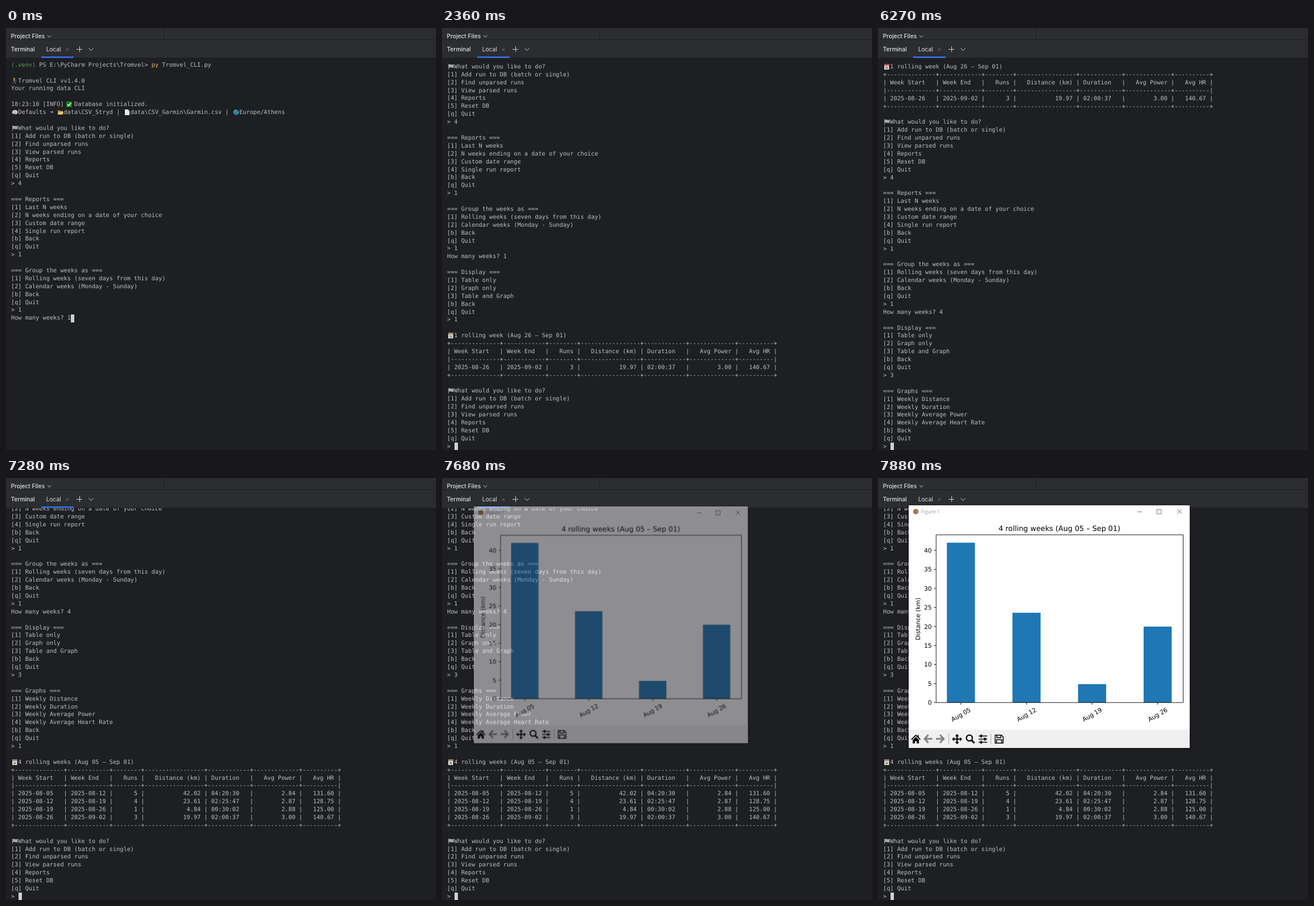
An HTML page that plays this animation: 756 px wide and 741 px high, repeating every 8000 ms.

```html
<!DOCTYPE html>
<html lang="en">
<head>
<meta charset="utf-8">
<title>Terminal report</title>
<style>
html, body { margin: 0; width: 100%; height: 100%; overflow: hidden; background: #1e1f22; }
#stage { position: absolute; left: 0; top: 0; width: 756px; height: 741px; overflow: hidden; background: #1e1f22; }
#stage > svg, #stage > div { position: absolute; }
#bars { left: 0; top: 0; }
#bars text { font: 500 10.2px Inter, sans-serif; fill: #dfe1e5; }
#term { left: 0; top: 53px; width: 756px; height: 688px; overflow: hidden; }

#log {
  position: absolute; left: 9px; top: 5.8px; margin: 0; white-space: pre; color: #bcbec4;
  font: 10.25px/13.89px "DejaVu Sans Mono", "Noto Sans Mono", monospace;
  text-rendering: geometricPrecision; font-variant-ligatures: none;
}
#log, #log span, #log i, #cursor, #win, #plot { animation: 8s step-end infinite; }
#log { animation-name: scroll; }
#log i { position: relative; font-style: normal; color: #a08a78; }
#log i svg { position: absolute; left: 0; top: 0; overflow: visible; }
#log .check svg { left: -2px; }
.venv { color: #5fa04e; }
.cmd { color: #e3c565; }
#log .display { animation-name: display; }
#log .key1 { animation-name: key1; }
#log .week { animation-name: week; }
#log .week .cal { animation-name: tint; }
#log .graphs { animation-name: graphs; }
#log .key2 { animation-name: key2; }
#log .month { animation-name: month; }

#cursor { left: 0; top: 0; width: 6px; height: 14px; background: #ced0d6; animation-name: place, blink; }
#win { left: 54px; top: 48px; transform-origin: 0 0; box-shadow: 0 1px 4px rgba(0, 0, 0, .4); animation-name: open; }
#plot { animation-name: plot; }
#win text { font-family: "DejaVu Sans", sans-serif; font-size: 10.64px; text-rendering: geometricPrecision; }

@keyframes scroll {
  0% { transform: none; }
  29.5% { transform: translateY(-108px); }
  66.875% { transform: translateY(-580px); }
  91%, 100% { transform: translateY(-844px); }
}
@keyframes display { 0% { opacity: 0; } 6.875%, 100% { opacity: 1; } }
@keyframes key1 { 0% { opacity: 0; } 19.25%, 100% { opacity: 1; } }
@keyframes week { 0% { opacity: 0; } 29.5%, 100% { opacity: 1; } }
@keyframes tint { 0% { color: #a08a78; } 66.875%, 100% { color: #c8493f; } }
@keyframes graphs { 0% { opacity: 0; } 66.875%, 100% { opacity: 1; } }
@keyframes key2 { 0% { opacity: 0; } 86.875%, 100% { opacity: 1; } }
@keyframes month { 0% { opacity: 0; } 91%, 100% { opacity: 1; } }
@keyframes place {
  0% { transform: translate(114px, 503px); }
  6.875% { transform: translate(22px, 614px); }
  19.25% { transform: translate(28px, 614px); }
  29.5% { transform: translate(22px, 728px); }
  86.875% { transform: translate(28px, 728px); }
  91%, 100% { transform: translate(22px, 728px); }
}
@keyframes blink {
  0%, 6.875%, 19.25%, 29.5%, 42.125%, 54.5%, 66.875%, 78.375%, 86.875%, 100% { opacity: 1; }
  6%, 13.5%, 26.125%, 36.125%, 48.75%, 61.125%, 72.625%, 85.25% { opacity: 0; }
}
@keyframes open {
  0% { opacity: 0; transform: none; }
  95.125% { opacity: .15; transform: translate(3px, 3.3px) scale(.956); }
  96% { opacity: .5; transform: translate(2px, 2px) scale(.975); }
  96.75% { opacity: .815; transform: translate(.8px, .8px) scale(.9885); }
  97.625% { opacity: .96; transform: translate(.3px, .3px) scale(.997); }
  98.5%, 100% { opacity: 1; transform: none; }
}
@keyframes plot { 0% { opacity: 0; } 96%, 100% { opacity: 1; } }
</style>
</head>
<body>
<div id="stage">
  <svg id="bars" width="756" height="53">
    <rect width="756" height="52" fill="#2b2d30"/>
    <path d="M0 20.5H756M277.5 0V20" stroke="#1e1f22"/>
    <text x="8.5" y="17.7">Project Files</text>
    <text x="8.5" y="41.2">Terminal</text>
    <text x="70.7" y="41.2" style="font-weight:400">Local</text>
    <path d="M62 51.3H119" stroke="#3574f0" stroke-width="2.4"/>
    <g fill="none" stroke="#ced0d6">
      <path d="M73 13l3.2 3.2L79.4 13M124 37.5h10M129.5 32v10M145.5 35.5l4 4 4-4"/>
      <path d="M105.5 35.5l5 5m0-5l-5 5" stroke="#7d8087" stroke-width=".8"/>
    </g>
  </svg>
  <div id="term"><pre id="log"></pre></div>
  <div id="cursor"></div>
  <svg id="win" width="494" height="426" viewBox="54 48 494 426">
    <path fill="#fff" d="M54 48h494v426H54z"/>
    <path fill="none" stroke="#666" stroke-width=".9" d="M456 59.5h8M490.5 55.500h7.5v7.5h-7.5zM526 55l8 8m0-8l-8 8"/>
    <g id="plot">
      <circle cx="66.5" cy="59" r="4.8" fill="#a8794f"/>
      <text x="76" y="62.3" fill="#999" style="font:8.8px 'Open Sans',sans-serif">Figure 1</text>
      <text x="319" y="93.3" text-anchor="middle" style="font-size:12.77px">4 rolling weeks (Aug 05 – Sep 01)</text>
      <text transform="translate(74 247.5) rotate(-90)" text-anchor="middle">Distance (km)</text>
      <g id="chart"></g>
      <path fill="none" stroke="#000" stroke-width=".9" d="M102.2 99.8H536.5V394.3H102.2z"/>
      <path fill="#f0f0f0" d="M54 442h494v32H54z"/>
      <path stroke="#a8a8a8" d="M124.5 448.5v19M198.5 448.5v19"/>
      <path d="M66.5 450.5l2.8 2.7v-1.7h2.2v3.8l3.5 3.4-1.2 1.2-7.3-7-7.3 7-1.2-1.2zM61 460l5.5-5.2 5.5 5.2v6h-4v-4h-3v4h-4z"/>
      <path fill="none" stroke="#808080" stroke-width="3" d="M88.5 451l-6.5 7 6.5 7M83 458h12.5M109 451l6.5 7-6.5 7M114.5 458H102"/>
      <path stroke="#000" stroke-width="2.2" d="M133 458.5h12M139 452.5v12"/>
      <path d="M139 449.5l3.5 4h-7zM139 467.5l3.5-4h-7zM130 458.5l4-3.5v7zM148 458.5l-4-3.5v7z"/>
      <circle cx="160.7" cy="456.5" r="5.2" fill="none" stroke="#000" stroke-width="2.3"/>
      <path stroke="#000" stroke-width="3" d="M164.5 460.5l5 5"/>
      <path stroke="#000" stroke-width="1.6" d="M177 453h15M177 458.5h15M177 464h15"/>
      <path stroke="#000" stroke-width="3" d="M181.5 450.5v5M188 456v5M181.5 461.5v5"/>
      <path fill="none" stroke="#000" stroke-width="1.5" d="M206 451.5h11l3 3v11h-14zM209 451.5v4.5h7v-4.5M208.5 465v-5.5h9v5.5"/>
    </g>
  </svg>
</div>
<script>
const art = {
  run: '<circle cx="5.5" cy="1.8" r="1.3" fill="#e0b080"/><path d="M3 4.5l3-.8 2.5 2" stroke="#e8a03c" fill="none"/><path d="M5.6 4v3l2 1.5.4 2.5M5.4 7L3 10" stroke="#7d86c8" fill="none"/>',
  check: '<rect y="1" width="10" height="10" rx="1" fill="#14871a"/><path d="M2 6l2.3 2.5L8.2 3.5" stroke="#fff" stroke-width="1.5" fill="none"/>',
  brain: '<path d="M2 7C1 4 4 1.5 7 2c3 0 5 2 4.5 4.5C11 9 9 9 8 10L6 8.5C4 9.5 2.5 9 2 7z" fill="#d6cabb"/><path d="M4 5.5c2-1 2 1 4 0M6 7.5h3" stroke="#9c9084" stroke-width=".7" fill="none"/>',
  folder: '<path d="M2 2.5h3.5l1 1H11V10H2z" fill="#b5803a"/><path d="M3.5 5H12l-1 5H2z" fill="#eabf6a"/>',
  page: '<path d="M2 1h5.5L10 3.5V11H2z" fill="#e9ebee"/><path d="M7.5 1v2.5H10z" fill="#9fa6ad"/>',
  globe: '<circle cx="6.5" cy="6" r="5" fill="#2472b8"/><path d="M3 3l3-1.5L7 4 5 6 4 8 2 6zM8 5l3 .5-1 3-2 1.5z" fill="#4fa04a"/>',
  flag: '<path d="M2.5 1v10" stroke="#8a8d8c"/><path d="M3 2c2-1 3 1 8.5 0v5.5C8 8.5 6 6.5 3 7.5z" fill="#a6aaa6"/>',
  cal: '<path d="M2 1h8.5v10H2z" fill="#dcdcd8"/><path d="M2 1h8.5v3H2z" fill="currentColor"/><path d="M4 6h2v3H4M7.5 6v3.5" stroke="#55585c" stroke-width=".9" fill="none"/>'
};
const icon = (name, gap = '  ') => `<i class="${name}">${gap}<svg width="12" height="12">${art[name]}</svg></i>`;
const part = (name, text) => `<span class="${name}">${text}</span>`;

const list = (title, items, back = '[b] Back\n') =>
  `\n\n${title}\n${items.map((s, i) => `[${i + 1}] ${s}\n`).join('')}${back}[q] Quit\n> `;
const menu = list(icon('flag') + 'What would you like to do?',
  ['Add run to DB (batch or single)', 'Find unparsed runs', 'View parsed runs', 'Reports', 'Reset DB'], '');
const reports = list('=== Reports ===',
  ['Last N weeks', 'N weeks ending on a date of your choice', 'Custom date range', 'Single run report']);
const group = list('=== Group the weeks as ===',
  ['Rolling weeks (seven days from this day)', 'Calendar weeks (Monday - Sunday)']);
const display = list('=== Display ===', ['Table only', 'Graph only', 'Table and Graph']);
const graphs = list('=== Graphs ===',
  ['Weekly Distance', 'Weekly Duration', 'Weekly Average Power', 'Weekly Average Heart Rate']);
const ask = n => `4${reports}1${group}1\nHow many weeks? ${n}`;

const widths = [14, 12, 8, 17, 12, 13, 10];
const leftCols = [0, 1, 4];
const row = cells => '|' + cells.map((c, i) => leftCols.includes(i)
  ? ` ${c}`.padEnd(widths[i]) : `${c} `.padStart(widths[i])).join('|') + '|';
const rule = end => end + widths.map(w => '-'.repeat(w)).join('+') + end;
const heads = ['Week Start', 'Week End', 'Runs', 'Distance (km)', 'Duration', 'Avg Power', 'Avg HR'];
const table = (title, rows) => '\n\n' + [icon('cal') + title, rule('+'), row(heads), rule('|'),
  ...rows.map(row), rule('+')].join('\n');

const weeks = [
  ['2025-08-05', '2025-08-12', 5, '42.02', '04:20:30', '2.84', '131.60'],
  ['2025-08-12', '2025-08-19', 4, '23.61', '02:25:47', '2.87', '128.75'],
  ['2025-08-19', '2025-08-26', 1, '4.84', '00:30:02', '2.88', '125.00'],
  ['2025-08-26', '2025-09-02', 3, '19.97', '02:00:37', '3.00', '140.67']
];
const intro = String.raw`${part('venv', '(.venv)')} PS E:\PyCharm Projects\Tromvel> ${part('cmd', 'py')} Tromvel_CLI.py

${icon('run')}Tromvel CLI vv1.4.0
Your running data CLI

18:23:10 [INFO] ${icon('check', ' ')} Database initialized.
${icon('brain')}Defaults ➜ ${icon('folder')}data\CSV_Stryd | ${icon('page')}data\CSV_Garmin\Garmin.csv | ${icon('globe')}Europe/Athens`;

document.getElementById('log').innerHTML = intro + menu + ask(1)
  + part('display', display) + part('key1', '1')
  + part('week', table('1 rolling week (Aug 26 – Sep 01)', weeks.slice(3)) + menu)
  + part('graphs', ask(4) + display + '3' + graphs) + part('key2', '1')
  + part('month', table('4 rolling weeks (Aug 05 – Sep 01)', weeks) + menu);

// Bar chart
const base = 394.3, perKm = 6.68;
let chart = '';
for (let km = 0; km <= 40; km += 5) {
  const y = base - km * perKm;
  chart += `<path d="M98.4 ${y}h3.8" stroke="#000" stroke-width=".9"/><text x="94.5" y="${y + 3.9}" text-anchor="end">${km}</text>`;
}
weeks.forEach((w, i) => {
  const x = 145.8 + i * 115.3, h = w[3] * perKm;
  chart += `<rect x="${x - 24.7}" y="${base - h}" width="49.4" height="${h}" fill="#1f77b4"/>
    <path d="M${x} ${base}v3.8" stroke="#000" stroke-width=".9"/>
    <text transform="translate(${x} 415.5) rotate(-30)" y="3.7" text-anchor="middle">Aug ${w[0].slice(8)}</text>`;
});
document.getElementById('chart').innerHTML = chart;
</script>
</body>
</html>
```
